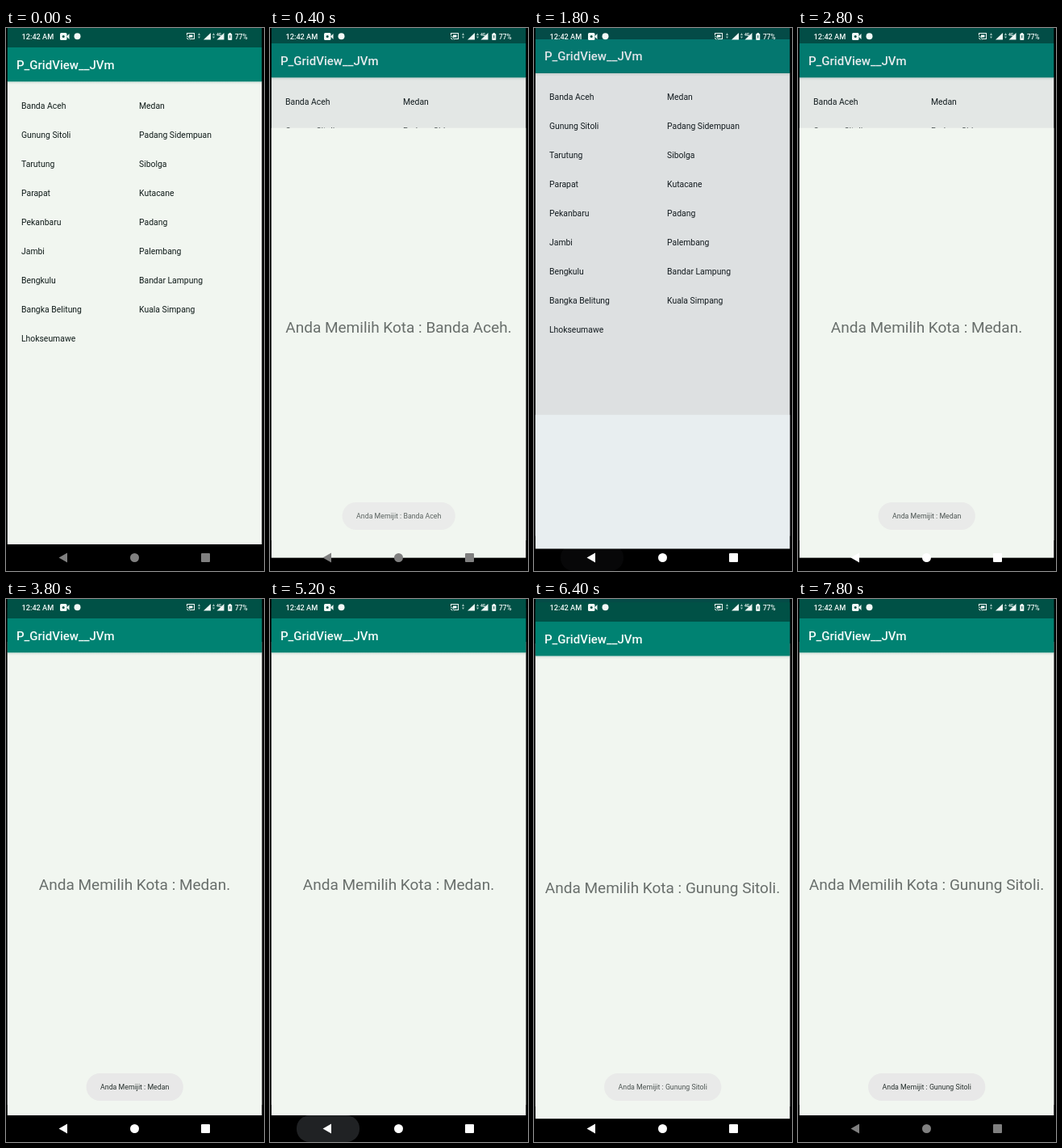
An HTML page with a canvas that plays this animation: 320 px wide and 672 px high, repeating every 8000 ms.

```html
<!DOCTYPE html>
<html lang="id">
<head>
<meta charset="utf-8">
<title>Grid kota</title>
<style>
  html, body { margin: 0; width: 100%; height: 100%; overflow: hidden; background: #000; }
  canvas { display: block; width: 320px; height: 672px; }
</style>
</head>
<body>
<canvas id="stage" width="320" height="672"></canvas>
<script>
const ctx = document.getElementById('stage').getContext('2d');
const W = 320, H = 672, LOOP = 8000, STEP = 200, SLIDE = 425;
const LEFT = 1.8, PANE_W = 315.5, NAV_TOP = 639;
const PAPER = '#f1f6f0';

const cities = ['Banda Aceh', 'Medan', 'Gunung Sitoli', 'Padang Sidempuan', 'Tarutung', 'Sibolga',
  'Parapat', 'Kutacane', 'Pekanbaru', 'Padang', 'Jambi', 'Palembang', 'Bengkulu', 'Bandar Lampung',
  'Bangka Belitung', 'Kuala Simpang', 'Lhokseumawe'];

const visits = [
  { city: 'Banda Aceh', open: 270, close: 1700, toast: [220, 1750] },
  { city: 'Medan', open: 2670, close: 5300, toast: [2600, 4700] },
  { city: 'Gunung Sitoli', open: 6160, close: Infinity, toast: [6200, 8300] }
];

const clamp = v => Math.min(1, Math.max(0, v));

// Cubic bezier (.4, 0, .2, 1), solved by bisection.
function ease(x) {
  if (x <= 0 || x >= 1) return clamp(x);
  let low = 0, high = 1, s = 0.5;
  for (let i = 0; i < 20; i++) {
    s = (low + high) / 2;
    const at = 1.2 * (1 - s) ** 2 * s + 0.6 * (1 - s) * s * s + s ** 3;
    if (at < x) low = s; else high = s;
  }
  return 3 * (1 - s) * s * s + s ** 3;
}

function rect(x, y, w, h, color) {
  ctx.fillStyle = color;
  ctx.fillRect(x, y, w, h);
}

function pill(x, y, w, h, r, color) {
  ctx.fillStyle = color;
  ctx.beginPath();
  ctx.roundRect(x, y, w, h, r);
  ctx.fill();
}

function dot(x, y, r, color) {
  ctx.fillStyle = color;
  ctx.beginPath();
  ctx.arc(x, y, r, 0, 7);
  ctx.fill();
}

function polygon(color, ...points) {
  ctx.fillStyle = color;
  ctx.beginPath();
  points.forEach(([x, y]) => ctx.lineTo(x, y));
  ctx.fill();
}

function text(str, x, y, size, color, weight = 400, align = 'left') {
  ctx.font = `${weight} ${size}px Roboto, sans-serif`;
  ctx.textAlign = align;
  ctx.fillStyle = color;
  ctx.fillText(str, x, y);
}

function pane(dy, top, paper, content) {
  ctx.save();
  ctx.beginPath();
  ctx.rect(0, top, W, H - top);
  ctx.clip();
  ctx.translate(0, dy);
  rect(LEFT, 66, PANE_W, NAV_TOP - 66, paper);
  const shadow = ctx.createLinearGradient(0, 66, 0, 70);
  shadow.addColorStop(0, 'rgba(0,60,50,.12)');
  shadow.addColorStop(1, 'rgba(0,60,50,0)');
  rect(LEFT, 66, PANE_W, 4, shadow);
  rect(LEFT, 0, PANE_W, 24, '#005146');
  rect(LEFT, 24, PANE_W, 42.3, '#008272');
  text('P_GridView__JVm', 13, 50.5, 15, '#f4fbf9', 500);
  content();
  ctx.restore();
}

function cityGrid() {
  cities.forEach((city, i) =>
    text(city, i % 2 ? 165 : 19, 99.7 + 36 * (i >> 1), 10.4, '#101c1a'));
}

function toast(city, alpha) {
  const label = 'Anda Memijit : ' + city;
  ctx.globalAlpha = alpha;
  ctx.font = '400 8.8px Roboto, sans-serif';
  const width = ctx.measureText(label).width + 35;
  pill(159.7 - width / 2, 587, width, 34, 17, '#e8e8e8');
  text(label, 159.7, 607, 8.8, '#26302d', 400, 'center');
  ctx.globalAlpha = 1;
}

function signal(x) {
  polygon('#eef6f4', [x, 14.5], [x + 9, 14.5], [x + 9, 6]);
}

function updown(x) {
  polygon('#9fc4bd', [x, 9], [x + 3, 9], [x + 1.5, 6]);
  polygon('#9fc4bd', [x, 10.5], [x + 3, 10.5], [x + 1.5, 13]);
}

function statusIcons() {
  const white = '#f2f8f6', dark = '#005146';
  text('12:42 AM', 19.5, 13.5, 9.2, white, 500);
  pill(67, 6, 8.5, 9, 1.5, white);
  polygon(white, [75, 10.5], [78.5, 7], [78.5, 14]);
  dot(71.2, 10.5, 1.5, dark);
  dot(88.5, 10.3, 4, white);

  ctx.strokeStyle = white;
  ctx.lineWidth = 1;
  ctx.strokeRect(224.5, 6.5, 9, 7);
  rect(224, 9, 5, 5.5, dark);
  rect(227, 8.5, 4.5, 3, white);
  for (const r of [2, 4.3]) {
    ctx.beginPath();
    ctx.arc(224, 14.5, r, -Math.PI / 2, 0);
    ctx.stroke();
  }
  updown(238);
  signal(245);
  updown(256);
  signal(261.5);
  text('4G', 261, 10, 5, white, 700);
  pill(275.3, 7, 5, 8, 0.8, white);
  rect(276.7, 6, 2.2, 1.5, white);
  rect(277.3, 9, 1, 3.5, dark);
  text('77%', 284, 13.5, 8.4, white, 500);
}

function backRipple(t) {
  for (const { close } of visits) {
    if (t < close - 160) continue;
    ctx.globalAlpha = clamp(1 - (t - close) / 130);
    pill(33, NAV_TOP, 78, 33, 16, '#202224');
    ctx.globalAlpha = 1;
  }
}

function navigation(t) {
  const bright = visits.some(v => t > v.close - 160 && t < v.close + 2200);
  const color = bright ? '#fff' : '#808080';
  polygon(color, [65.5, 655.5], [76, 649.5], [76, 661.5]);
  dot(159.5, 655.5, 5.5, color);
  pill(242, 650, 11, 11, 1, color);
}

function draw(t) {
  const visit = visits.findLast(v => t >= v.open);
  const closing = visit && t >= visit.close;
  const moved = visit ? ease((t - (closing ? visit.close : visit.open)) / SLIDE) : 0;
  const cover = closing ? 1 - moved : moved;

  rect(0, 0, W, H, '#000');
  backRipple(t);
  pane(-13 * cover, 0, PAPER, cityGrid);
  if (cover > 0) {
    rect(LEFT, 0, PANE_W, NAV_TOP - 13 * cover, `rgba(40,20,80,${0.11 * Math.sqrt(cover)})`);
    const hidden = closing ? 1 - cover ** 5.5 : (1 - cover) ** 3.5;
    pane(27 * (1 - cover), H * hidden, closing ? '#e8eef0' : PAPER, () =>
      text(`Anda Memilih Kota : ${visit.city}.`, 159.5, 360, 19, '#686e6b', 400, 'center'));
  }
  statusIcons();
  for (const { city, toast: [start, end] } of visits) {
    const alpha = Math.min(clamp((t - start) / 250), clamp((end - t) / 200));
    if (alpha > 0) toast(city, alpha);
  }
  navigation(t);
}

function tick(now) {
  draw(Math.floor(now % LOOP / STEP) * STEP);
  requestAnimationFrame(tick);
}
requestAnimationFrame(tick);
</script>
</body>
</html>
```
